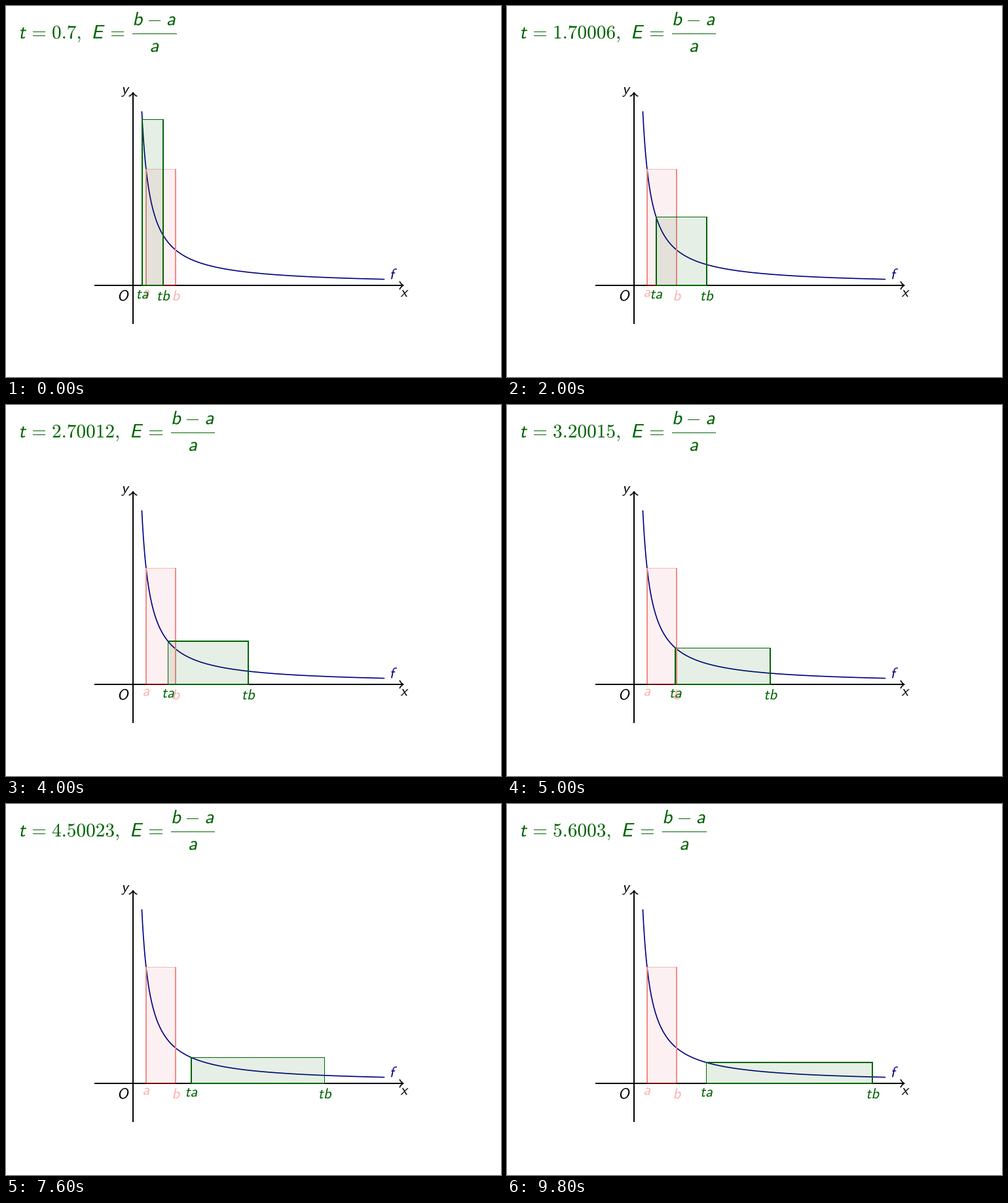
These frames come from a looping animation (756x567 px, 10 s). A matplotlib script:

```python
import math

import matplotlib.pyplot as plt
import numpy as np
from matplotlib.animation import FuncAnimation
from matplotlib.patches import PathPatch, Rectangle
from matplotlib.path import Path
from matplotlib.textpath import TextPath
from matplotlib.transforms import Affine2D

W, H = 756, 567
FRAMES, INTERVAL = 50, 200
UNIT = W / 12.8              # pixels per plot unit
OX, OY = 194.27, 426.73      # origin in pixels
LINE = 1.66                  # thick line width in pixels
A, B = 1 / 3, 1.1
BIG, SMALL = 29.3, 22.7      # em sizes in pixels
SLANT = 0.2126
PAD = 7.57                   # gap between a label and its anchor
GREEN, NAVY = "#006400", "#000080"

# advance widths in em
ADVANCE = {"t": .361, "a": .481, "b": .517, "O": .736, "x": .461,
           "y": .461, "f": .306, "E": .597, ".": .278, ",": .278}

plt.rcParams["mathtext.fontset"] = "cm"
fig = plt.figure(figsize=(W / 100, H / 100), dpi=100, facecolor="white")
ax = fig.add_axes([0, 0, 1, 1])
ax.set_xlim(0, W)
ax.set_ylim(H, 0)
ax.axis("off")

glyphs = {}
moving = []


def px(x):
    return OX + UNIT * x


def py(y):
    return OY - UNIT * y


def glyph(ch):
    if ch not in glyphs:
        glyphs[ch] = TextPath((0, 0), r"$\mathsf{%s}$" % ch, size=100)
    return glyphs[ch]


def width(text, em):
    return em * sum(ADVANCE.get(ch, .5) for ch in text)


def put(text, x, base, em, color, z=9, slant=SLANT):
    """Draw text from its left end on a baseline; return the right end."""
    out = []
    k = em / 100
    for ch in text:
        place = Affine2D(np.array([[k, k * slant, x], [0, -k, base], [0, 0, 1]]))
        patch = PathPatch(glyph(ch).transformed(place), fc=color, lw=0, zorder=z)
        out.append(ax.add_patch(patch))
        x += width(ch, em)
    moving.extend(out)
    return x


def centred(text, x, base, color, z=9):
    put(text, x - width(text, SMALL) / 2, base, SMALL, color, z)


def box(x0, y0, x1, y1, color, z, alpha=None):
    patch = Rectangle((x0, y0), x1 - x0, y1 - y0, fc=color, lw=0,
                      zorder=z, alpha=alpha)
    moving.append(ax.add_patch(patch))


def span(c):
    """Whole pixels whose centres lie under a thick line at c."""
    return math.ceil(c - LINE / 2 - .5), math.floor(c + LINE / 2 - .5) + 1


def edges(x0, x1, top, sides, lid, floor, z):
    left, right, up, down = span(x0), span(x1), span(top), span(OY)
    box(left[0], down[0], right[1], down[1], floor, z)
    box(left[0], up[0], right[1], up[1], lid, z)
    for side in (left, right):
        box(side[0], up[0], side[1], down[0], sides, z)


def arrow_tip(x, y, turn):
    a = 1.43
    pts = [(-3.75, 4), (-3.5, 2.5), (-.75, .25), (0, 0),
           (-.75, -.25), (-3.5, -2.5), (-3.75, -4)]
    path = Path(np.array(pts) * a, [1] + [4] * 6)
    path = path.transformed(Affine2D().rotate_deg(turn).translate(x, y))
    ax.add_patch(PathPatch(path, fc="none", ec="black", lw=LINE * .72,
                           capstyle="round", joinstyle="round", zorder=2))


def draw_plot():
    xs, ys = span(OY), span(OX)
    box(px(A), py(1 / A), px(B), OY, "#fdf0f2", 1)
    box(px(-1), xs[0], px(7) - 1.5, xs[1], "black", 2)
    box(ys[0], py(5) + 1.5, ys[1], py(-1), "black", 2)
    arrow_tip(px(7) - .9, 427, 0)
    arrow_tip(194, py(5) + .9, -90)

    x = np.geomspace(1 / 4.5, 6.5, 200)
    ax.plot(px(x), py(1 / x), color=NAVY, lw=LINE * .72,
            solid_capstyle="butt", zorder=3)
    edges(px(A), px(B), py(1 / A), "#f28a84", "#ebbcb9", "#780000", 4)

    centred("a", px(A), 444.4, "#fdb2b0", 5)
    centred("b", px(B), 450.1, "#fdb2b0", 5)
    put("O", OX - PAD - width("O", SMALL), 450.3, SMALL, "black")
    put("y", OX - PAD - width("y", SMALL), 134.2, SMALL, "black")
    centred("x", px(7), 444.5, "black")
    put("f", px(6.5) + PAD, 417.4, SMALL, NAVY)
    put("t", 19, 49.7, BIG, GREEN)
    equals(39)


def bar(x, y, w, h=1.2):
    box(x, y - h / 2, x + w, y + h / 2, GREEN, 9)


def equals(x):
    for y in (39.4, 45.1):
        bar(x + 1.7, y, 19.5)


def fixed_point(i):
    """Shortest decimal text of a value kept in 1/65536 steps."""
    units = 45875 + 6554 * i
    value = units / 65536
    for places in range(1, 6):
        text = f"{value:.{places}f}"
        if round(float(text) * 65536) == units:
            break
    return value, text


def draw_header(text):
    x = put(text + ",", 70, 49.7, BIG, GREEN, slant=0)
    x += 14.8
    put("E", x, 49.7, BIG, GREEN)
    equals(x + 28.7)
    x += 62.7
    box(round(x), 42, round(x + 67.5), 43, GREEN, 9)
    put("b", x, 29.5, BIG, GREEN)
    bar(x + 24.6, 22.2, 18.2)
    put("a", x + 51.8, 29.5, BIG, GREEN)
    put("a", x + 26.4, 70.2, BIG, GREEN)


draw_plot()
moving.clear()


def update(i):
    for artist in moving:
        artist.remove()
    moving.clear()
    t, text = fixed_point(i)
    left, right, top = px(t * A), px(t * B), py(1 / (t * A))
    box(left, top, right, OY, GREEN, 6, .1)
    edges(left, right, top, GREEN, GREEN, GREEN, 7)
    centred("ta", left, 447.3, GREEN)
    centred("tb", right, 450.1, GREEN)
    draw_header(text)
    return []


anim = FuncAnimation(fig, update, frames=FRAMES, interval=INTERVAL,
                     init_func=lambda: [], repeat=True, repeat_delay=0)
plt.show()
```
